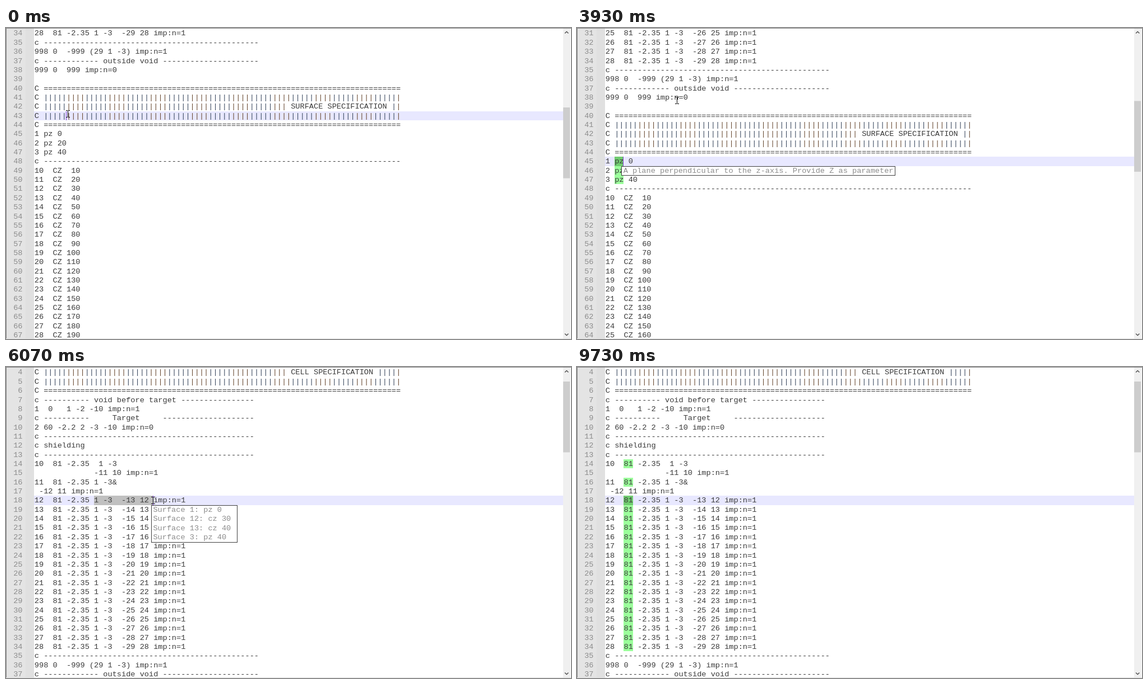
An HTML page with a canvas that plays this animation: 1008 px wide and 556 px high, repeating every 9.8 s.

```html
<!DOCTYPE html>
<html lang="en">
<head>
<meta charset="utf-8">
<title>Editor session</title>
<style>
  html, body { margin: 0; width: 100%; height: 100%; overflow: hidden; background: #fff; }
  canvas { display: block; }
</style>
</head>
<body>
<canvas id="stage" width="1008" height="556"></canvas>
<script>
const ctx = document.getElementById('stage').getContext('2d');
const LOOP = 9800, TICK = 200 / 3;
const LEFT = 50.8, ADV = 8.17, ROW = 16.355, TOP = 1.86, ROWS = 34;
const FONT = `${ADV / 0.6001}px "Liberation Mono", "Courier New", monospace`;

// Document, indexed by line number
const dash = n => '-'.repeat(n), bar = n => '|'.repeat(n);
const rule = 'C ' + '='.repeat(78), bars = 'C ' + bar(78);
const doc = [];
const put = (start, ...lines) => lines.forEach((s, i) => doc[start + i] = s);
put(1, '', rule, bars, `C ${bar(53)} CELL SPECIFICATION ${bar(5)}`, bars, rule,
  `c ${dash(10)} void before target ${dash(16)}`,
  '1  0   1 -2 -10 imp:n=1',
  `c ${dash(10)}     Target     ${dash(20)}`,
  '2 60 -2.2 2 -3 -10 imp:n=0',
  `c ${dash(46)}`, 'c shielding', `c ${dash(46)}`,
  '10  81 -2.35  1 -3', ' '.repeat(13) + '-11 10 imp:n=1',
  '11  81 -2.35 1 -3&', ' -12 11 imp:n=1');
for (let n = 12; n <= 28; n++) doc[n + 6] = `${n}  81 -2.35 1 -3  -${n + 1} ${n} imp:n=1`;
put(35, `c ${dash(47)}`, '998 0  -999 (29 1 -3) imp:n=1',
  `c ${dash(12)} outside void ${dash(21)}`, '999 0  999 imp:n=0', '',
  rule, bars, `C ${bar(53)} SURFACE SPECIFICATION ${bar(2)}`, bars, rule,
  '1 pz 0', '2 pz 20', '3 pz 40', `c ${dash(78)}`);
for (let n = 10; n <= 28; n++) doc[n + 39] = `${n}  CZ${String((n - 9) * 10).padStart(4)}`;

const material = [['1001', '0056'], ['8016', '4983'], ['11023', '0171'], ['12024', '0024'],
  ['13027', '0456'], ['14028', '3158'], ['20040', '0826'], ['26056', '0122']]
  .map(([id, part], i) => (i ? '   ' : 'm81') + `${id}.70c`.padStart(10) + `  -0.${part}00`);

// Editor state changes; each entry is merged into what came before
const none = { from: null, word: '', tip: [] };
const events = [
  [0, { ...none, top: 34, line: 43, caret: 7 }],
  [1070, { line: 49, caret: 5 }],
  [1200, { from: 4, caret: 6, word: 'CZ' }],
  [1270, { tip: ['A cylinder along the z-axis. Provide R as parameter'] }],
  [2400, { ...none, line: 45, caret: 3 }],
  [2530, { from: 2, caret: 4, word: 'pz' }],
  [2600, { tip: ['A plane perpendicular to the z-axis. Provide Z as parameter'] }],
  [2800, { top: 31 }],
  [4000, { top: 19 }],
  [4070, { top: 4 }],
  [5470, { ...none, line: 18, caret: 13 }],
  [5600, { from: 13, caret: 14, word: '1' }],
  [5670, { caret: 16, word: '' }],
  [5730, { caret: 18 }],
  [5800, { caret: 20 }],
  [5870, { caret: 22 }],
  [5930, { caret: 24 }],
  [6000, { caret: 26 }],
  [6070, { tip: ['Surface 1: pz 0', 'Surface 12: cz 30', 'Surface 13: cz 40', 'Surface 3: pz 40'], pad: 1 }],
  [6670, { hideCaret: true }],
  [7800, { ...none, caret: 5, hideCaret: false, pad: 0 }],
  [8070, { from: 4, caret: 6, word: '81' }],
  [8130, { tip: material }],
  [9670, { tip: [], hideCaret: true, hidePointer: true }],
];

// Pointer path: time, x, y
const path = [
  [200, 110, 153], [670, 93, 291], [930, 97, 259], [1530, 97, 259], [1800, 80, 205],
  [1930, 80, 205], [2070, 81, 193], [2730, 81, 193], [3130, 87, 264], [3470, 87, 264],
  [3730, 167, 21], [3800, 167, 21], [3930, 178, 129], [4270, 178, 129], [4670, 154, 222],
  [4800, 166, 234], [4930, 166, 234], [5330, 160, 238], [5530, 160, 238],
  [6070, 262, 238], [6600, 262, 238], [7130, 190, 243], [7600, 104, 239],
  [7670, 101, 239], [7930, 94, 237], [8530, 94, 237], [9000, 117, 539], [9400, 106, 300],
];

function pointerAt(t) {
  const i = path.findIndex(p => p[0] > t);
  if (i <= 0) return (i ? path[path.length - 1] : path[0]).slice(1);
  const a = path[i - 1], b = path[i], u = (t - a[0]) / (b[0] - a[0]), k = u * u * (3 - 2 * u);
  return [a[1] + (b[1] - a[1]) * k, a[2] + (b[2] - a[2]) * k];
}

const colX = c => LEFT + c * ADV;
function box(x, y, w, h, color) {
  ctx.fillStyle = color;
  ctx.fillRect(x, y, w, h);
}
function text(s, x, y, color) {
  ctx.fillStyle = color;
  ctx.fillText(s, x, y + 11.6);
}

function drawLine(n, y, s) {
  const current = n === s.line, src = doc[n] || '';
  const y0 = Math.floor(y), h = Math.floor(y + ROW) - y0;
  const cells = (from, count, color) => {
    const x = Math.round(colX(from));
    box(x, y0, Math.round(colX(from + count)) - x, h, color);
  };
  if (current) box(50, y0, 944, h, '#e8e8ff');
  if (current && s.from !== null) cells(s.from, s.caret - s.from, '#c0c0c0');
  if (s.word) {
    for (const m of src.matchAll(new RegExp(`\\b${s.word}\\b`, 'gi'))) {
      const selected = current && m.index === s.from;
      cells(m.index, m[0].length, selected ? '#70cc70' : '#9bff9b');
    }
  }
  ctx.textAlign = 'right';
  text(n, 29.5, y, '#8c8c8c');
  ctx.textAlign = 'left';
  text(src.replace(/\|/g, ' '), LEFT, y, '#3a3a3a');
  // Bars carry the alternating subpixel tint
  for (const m of src.matchAll(/\|/g))
    text('|', colX(m.index), y, (m.index + 2) % 9 < 4 ? '#6a4c34' : '#3c4a60');
  if (current && !s.hideCaret) box(Math.round(colX(s.caret)) - 1, y0, 1, h, '#8040d0');
}

function drawTip(s) {
  const row = s.line - s.top + 1;
  if (!s.tip.length || row < 1 || row > ROWS) return;
  const chars = Math.max(...s.tip.map(l => l.length)) + (s.pad || 0);
  const x = Math.round(colX(s.caret) - 4), y = Math.floor(TOP + row * ROW);
  const w = Math.round(chars * ADV + 7), h = Math.floor(s.tip.length * ROW + 1.6);
  box(x, y, w, h, '#404040');
  box(x + 1, y + 1, w - 2, h - 2, '#fff');
  s.tip.forEach((l, i) => text(l, colX(s.caret) - 0.8, y + 0.5 + i * ROW, '#8c8c8c'));
}

function chevron(y, dir) {
  ctx.strokeStyle = '#505050';
  ctx.lineWidth = 1.4;
  ctx.beginPath();
  ctx.moveTo(997, y + 1.5 * dir);
  ctx.lineTo(1000.2, y - 1.5 * dir);
  ctx.lineTo(1003.4, y + 1.5 * dir);
  ctx.stroke();
}

function drawScrollbar(top) {
  box(994, 1, 13, 554, '#f0f0f0');
  box(994, 26 + (top - 4) * 3.87, 12, 126.5, '#cdcdcd');
  chevron(8, 1);
  chevron(548, -1);
}

function drawPointer([px, py]) {
  const x = Math.round(px), y = Math.round(py);
  box(x, y - 5, 1, 11, '#000');
  for (const end of [-6, 6]) {
    box(x - 3, y + end, 3, 1, '#000');
    box(x + 1, y + end, 3, 1, '#000');
  }
}

function draw(ms) {
  const t = Math.floor((ms % LOOP + 4) / TICK) * TICK + 4;
  const s = Object.assign({}, ...events.filter(e => e[0] <= t).map(e => e[1]));
  box(0, 0, 1008, 556, '#fff');
  box(0, 0, 35, 555, '#e4e4e4');
  box(35, 0, 15, 555, '#e0e0e0');
  ctx.font = FONT;
  for (let i = 0; i < ROWS; i++) drawLine(s.top + i, TOP + i * ROW, s);
  drawTip(s);
  drawScrollbar(s.top);
  box(0, 0, 1008, 1, '#828282');
  box(0, 0, 1, 556, '#828282');
  box(0, 555, 1008, 1, '#e4e4e4');
  if (!s.hidePointer) drawPointer(pointerAt(t));
}

const start = performance.now();
function frame() {
  draw(performance.now() - start);
  requestAnimationFrame(frame);
}
frame();
</script>
</body>
</html>
```
